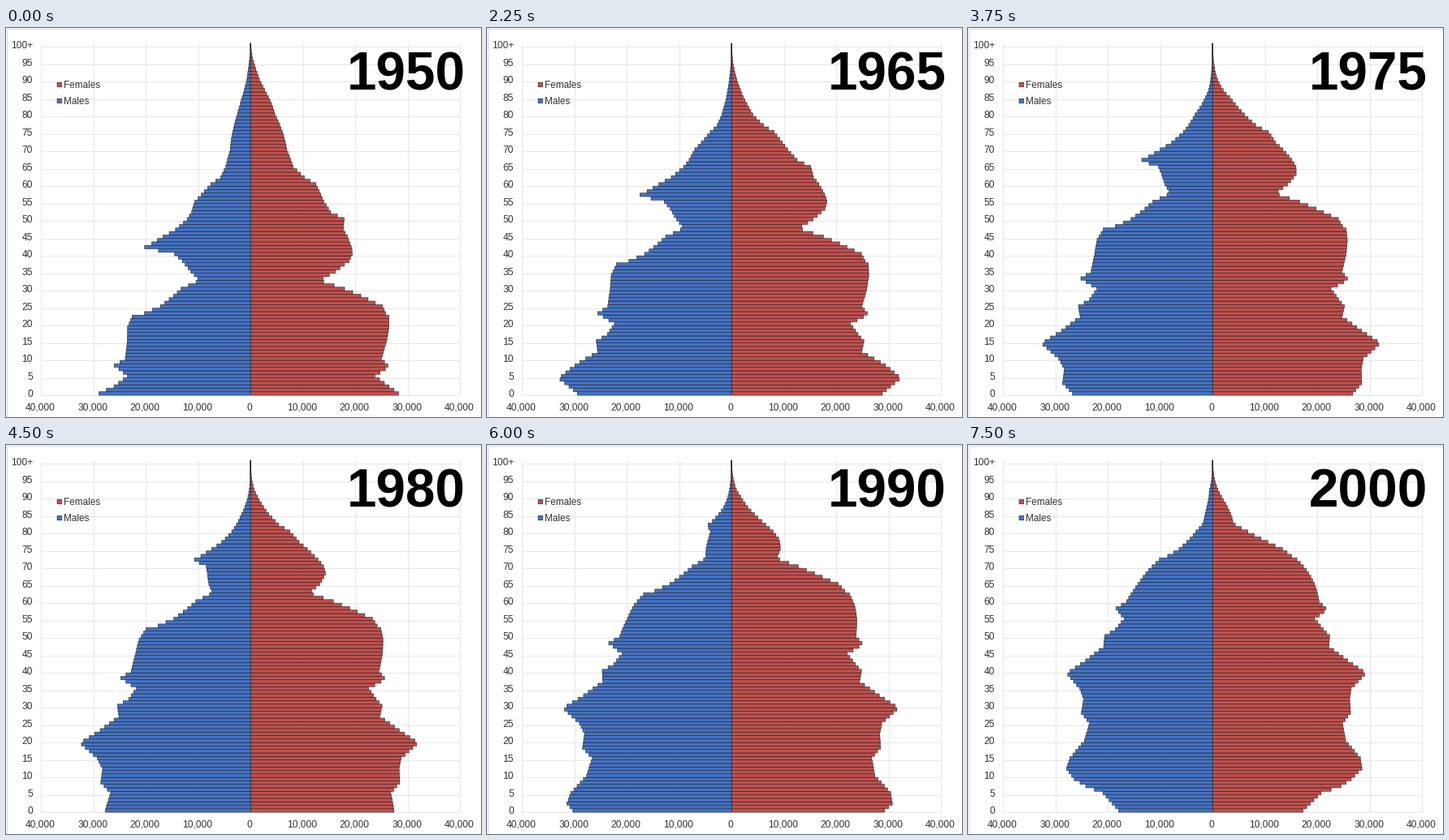
Recreate the animation shown at these times as a matplotlib script. Size 585x480 px, loop 8 s.

```python
import numpy as np
import matplotlib.pyplot as plt
from matplotlib.animation import FuncAnimation
from matplotlib.patches import Rectangle

W, H, DPI = 585, 480, 100
STEP_MS, LOOP_MS, HOLD = 250, 8000, 3
CX, TICK = 301.2, 64.5          # zero line and width of 10,000 people
BOTTOM, PITCH = 453.1, 4.3      # lower edge of age 0, height of one age
RED, BLUE, EDGE, GRID, INK = "#C0504D", "#4472C4", "#141414", "#E7E7E7", "#333333"
AGES = np.arange(101)

# Size of each birth cohort as young adults, in hundreds, at its turning points
BORN = [1855, 1860, 1870, 1880, 1885, 1888, 1890, 1895, 1898, 1900, 1903, 1905,
        1907, 1908, 1909, 1910, 1912, 1915, 1917, 1918, 1920, 1922, 1925, 1927,
        1928, 1931, 1935, 1940, 1942, 1943, 1945, 1948, 1950, 1953, 1955, 1957,
        1960, 1961, 1965, 1968, 1972, 1975, 1980, 1985, 1988, 1991, 1993, 1995, 2000]
MEN = [233, 140, 96, 70, 70, 78, 99, 127, 129, 136, 157, 181,
       202, 215, 186, 153, 136, 118, 104, 107, 136, 150, 175, 205,
       229, 237, 237, 240, 259, 248, 226, 239, 260, 256, 274, 291,
       322, 326, 295, 284, 287, 268, 278, 308, 315, 298, 273, 236, 202]
WOMEN = [279, 181, 116, 98, 101, 121, 143, 152, 163, 188, 184, 191,
         195, 197, 198, 198, 191, 164, 140, 141, 181, 212, 253, 259,
         265, 265, 260, 250, 260, 253, 228, 242, 253, 248, 267, 285,
         315, 318, 288, 284, 285, 268, 274, 304, 307, 285, 264, 223, 186]


def lengths(year, cohort, hazard, growth, leaving):
    """Bar lengths per age: cohort size, less mortality and emigration."""
    born = year - AGES
    alive = np.exp(-hazard * growth ** ((AGES - 40) / 10))
    wave = np.exp(-((born - 1951) / 6) ** 2) / (1 + np.exp(AGES - 9))
    stay = 1 - leaving * max(year - 1990, 0)
    people = np.interp(born, BORN, cohort) * alive * (1 + 0.12 * wave) * stay
    return np.maximum(people * TICK / 100, 0.5)


def males(year):
    return lengths(year, MEN, 0.052, 2.25, 0.011)


def females(year):
    return lengths(year, WOMEN, 0.020, 2.60, 0.007)


plt.rcParams["font.family"] = "Liberation Sans"
fig = plt.figure(figsize=(W / DPI, H / DPI), dpi=DPI, facecolor="white")
ax = fig.add_axes([0, 0, 1, 1])
ax.axis("off")


def px(size):
    return size * 72 / DPI


def label(x, y, text, size=12, **kw):
    kw = {"color": INK, **kw}
    return ax.text(x, y, text, fontsize=px(size), va="baseline", **kw)


def box(x, y, w, h, **kw):
    ax.add_patch(Rectangle((x, y), w, h, **kw))


def grid_line(xs, ys):
    ax.plot(xs, ys, color=GRID, lw=px(1), zorder=1)


top = BOTTOM - 101 * PITCH
box(0.5, 0.5, W - 1, H - 1, fill=False, ec="#D9D9D9", lw=px(1))

for k in range(-4, 5):
    x = CX + k * TICK
    grid_line([x, x], [top, BOTTOM])
    label(x - 1, 471.5, f"{abs(k) * 10000:,}", ha="center")

for age in range(0, 101, 5):
    y = BOTTOM - age * PITCH
    grid_line([CX - 4 * TICK, CX + 4 * TICK], [y, y])
    label(33, y + 2.2, "100+" if age == 100 else str(age), ha="right")

rows = BOTTOM - (AGES + 0.5) * PITCH
style = dict(height=PITCH, left=CX, edgecolor=EDGE, linewidth=px(0.5),
             snap=False, zorder=2)
left_bars = ax.barh(rows, -males(1950), color=BLUE, **style)
right_bars = ax.barh(rows, females(1950), color=RED, **style)
ax.set(xlim=(0, W), ylim=(H, 0))

for y, name, color in ((70, "Females", RED), (90, "Males", BLUE)):
    box(63, y - 2.8, 5.6, 5.6, fc=color, ec=EDGE, lw=px(0.5), snap=False)
    label(71.2, y + 4, name, size=11.8)

title = label(419.4, 76.3, "1950", size=65.6, weight="bold", color="black")


def draw(i):
    year = 1950 + 5 * (i // HOLD)
    for bars, widths in ((left_bars, -males(year)), (right_bars, females(year))):
        for bar, width in zip(bars, widths):
            bar.set_width(width)
    title.set_text(str(year))
    return [*left_bars, *right_bars, title]


anim = FuncAnimation(fig, draw, frames=LOOP_MS // STEP_MS, interval=STEP_MS,
                     repeat=True, repeat_delay=0, blit=False)
plt.show()
```
